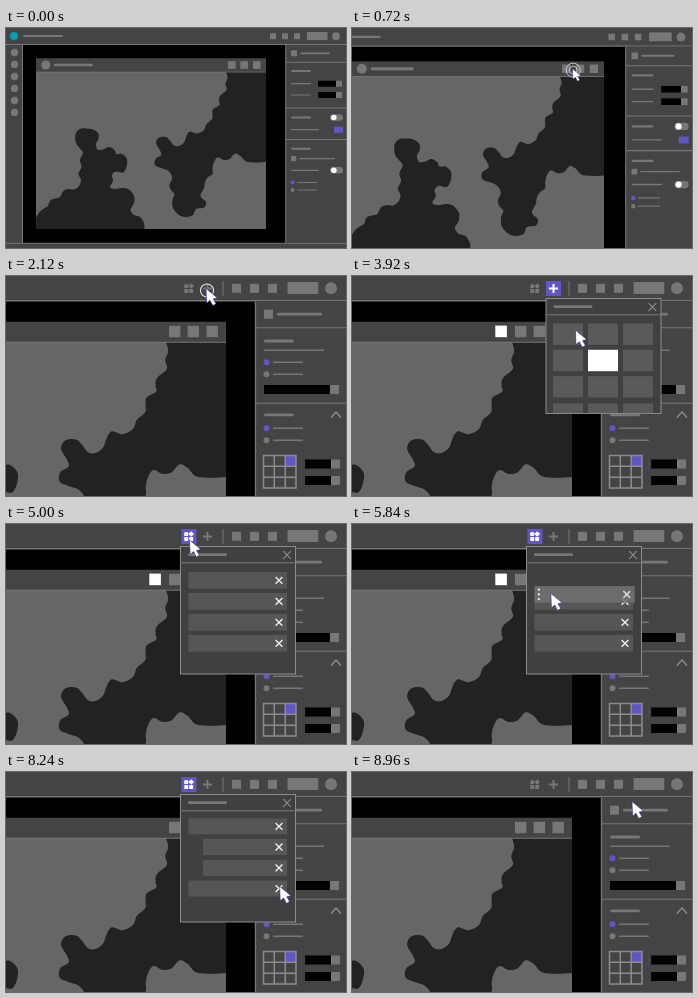
An HTML page for the animation above (9.6 s loop, 340x220 px).

```html
<!DOCTYPE html>
<html lang="en">
<head>
<meta charset="utf-8">
<title>Layout editor</title>
<style>
  html, body { margin: 0; width: 100%; height: 100%; overflow: hidden; background: #000; }
  svg { display: block; width: 340px; height: 220px; }
  .bar { fill: #444; }
  .ui { fill: #777; }
  .line { stroke: #777; fill: none; }
  .frame { stroke: #8c8c8c; stroke-width: 1.5; fill: none; }
  .accent { fill: #6057c4; }
  .ink { fill: #000; }
  .light { fill: #fff; }
  .map { fill: #666; }
  .land { fill: #222; }
  .pop { fill: #404040; stroke: #8c8c8c; }
  .cell { fill: #5a5a5a; }
  .row { fill: #565656; }
  .cross { stroke: #eee; stroke-width: 1.4; fill: none; }
  .dim { stroke: #8c8c8c; stroke-width: 1.2; }
  .ring { fill: none; stroke: #e4e4e4; stroke-width: 1.1; }
  .arrow { fill: #fff; stroke: #2c2482; stroke-width: .6; }
</style>
</head>
<body>
<svg viewBox="0 0 340 220">
  <g id="scene">
    <g id="base"></g>
    <!-- detail layer, drawn in zoomed pixels -->
    <g transform="translate(340 0) scale(.66667) translate(-340 0)">
      <g id="tools"></g>
      <g id="added"></g>
      <g id="plusOn"></g>
      <g id="gridOn"></g>
      <g id="picker"></g>
      <g id="list"></g>
      <g id="rings"><circle id="outer" class="ring"/><circle id="inner" class="ring"/></g>
      <path id="cursor" class="arrow" d="M0 -.5L.6 14L4 11.2L6.8 16.6L10 14.8L7.2 10L11.4 9Z"/>
    </g>
  </g>
</svg>
<script>
const LOOP = 9600, STEP = 40, ZOOM = 1.5;
const $ = id => document.getElementById(id);

// ---- drawing helpers ----
const rect = (c, x, y, w, h, r = 0) =>
  `<rect class="${c}" x="${x}" y="${y}" width="${w}" height="${h}" rx="${r}"/>`;
const dot = (c, x, y, r) => `<circle class="${c}" cx="${x}" cy="${y}" r="${r}"/>`;
const path = (c, d) => `<path class="${c}" d="${d}"/>`;
const bar = (x1, x2, y, h) => rect('ui', x1, y - h / 2, x2 - x1, h, h / 2);
const cross = (x, y, r, c = '') => path('cross ' + c, `M${x - r} ${y - r}l${2 * r} ${2 * r}m0 ${-2 * r}l${-2 * r} ${2 * r}`);
const each = (list, f) => list.map(f).join('');

// smooth open curve through points, given as "x,y x,y ..."
function curve(text) {
  const p = text.split(' ').map(s => s.split(',').map(Number));
  let d = 'M' + p[0];
  for (let i = 0; i < p.length - 1; i++) {
    const a = p[i - 1] || p[i], b = p[i], c = p[i + 1], e = p[i + 2] || c;
    const k = [0, 1];
    d += 'C' + k.map(j => b[j] + (c[j] - a[j]) / 6) + ' ' + k.map(j => c[j] - (e[j] - b[j]) / 6) + ' ' + c;
  }
  return d;
}

const west = curve('30,190 33.5,184 38,180.5 42,178 44,172.5 49,170.5 54,169 57,163.5 62,161 68,161.5 73,158 75,152 72.5,146 75.5,139 74,132 77,125 73.5,120 70,115 69.5,106 74,101 80,100.5 87,101.5 92,105 92.5,111 90,116 91.5,121.5 97,121.5 103,119 108.5,122 110.5,126 116,126 121,131 120.5,139 117,144.5 110,143.5 106,147 107,153 104,159 109,161 116,160 123,161.5 128,168 128,175 124.5,182 128,187 134,189 138,195 138.5,201');
const east = curve('220,44 221.5,50 219.5,56 220.5,62 214,68 213,73 213.5,77 207,81 206.5,86 206,91 200.5,96 198,102 191,105.5 184,103.5 180.5,108 178,114.5 173,118 168,117.5 164,112.5 160,109 153,109.5 150,115 154,122.5 155,127 149.5,131 149,137 155,140 161,142 165,146 166,151 163.5,157 165,162 168.5,166 166.5,172 167,180 173,187 180,189 187,187 190,181 198,179.5 200,174 194.5,168 198,160 199,154 202,149 206.5,146 206.5,140 208.5,133 212,129.3 218,132 224,130.7 229,125.5 234.5,128 240,133.5 250,134.5 260,134');

const toggle = y => rect('ui', 324, y - 3.3, 13, 6.6, 3.3) + dot('light', 327.8, y, 2.8);
const field = y => bar(285, 305, y, 1.2) + rect('ink', 312, y - 3, 18, 6) + rect('ui', 330, y - 3, 6, 6);
const rule = y => path('line', `M280 ${y}H340`);

$('base').innerHTML =
  rect('ink', 0, 0, 340, 220) +
  rect('bar', 0, 0, 340, 16.5) + rect('bar', 0, 16, 16.5, 200) + rect('bar', 0, 215, 340, 5) +
  path('line', 'M0 16.5H340M16.5 17V215M0 215.3H340') +
  `<circle cx="8" cy="8" r="4" fill="#00a3b4"/>` + bar(17, 57, 8, 2) +
  each([264, 276, 288], x => rect('ui', x, 5.2, 6, 6)) +
  rect('ui', 301, 4, 20.5, 8) + dot('ui', 330, 8.2, 4) +
  each([24, 36, 48, 60, 72, 84], y => dot('ui', 8.5, y + .5, 3.7)) +
  rect('map', 30, 30.6, 230, 170.4) +
  path('land', west + 'L30 201V190Z') + path('land', east + 'V44Z') +
  rect('bar', 30, 30.6, 230, 13.4) +
  `<path class="line" d="M30 44.1H260" stroke-width=".7"/>` +
  dot('ui', 39.8, 37, 4.5) + bar(48, 87, 37, 2.6) +
  each([222, 234.4, 247], x => rect('ui', x, 33.2, 7.6, 7.6)) +
  rect('bar', 280, 17, 60, 198) + path('line', 'M279.7 17V215') +
  '<g id="props">' +
  rect('ui', 285, 22.3, 6, 6) + bar(294, 324, 25.3, 1.8) + rule(34.3) +
  bar(285, 305, 43, 2) + field(55.7) + field(67) + rule(80) +
  bar(285, 305, 89.5, 2) + toggle(89.5) +
  bar(285, 313, 101.7, 1.2) + rect('accent', 328, 98.7, 9, 6.2) + rule(111.5) +
  bar(285, 305, 120.8, 2) + rect('ui', 285, 128, 5.2, 5.2) + bar(293, 329, 130.6, 1.2) +
  bar(285, 313, 142.3, 1.2) + toggle(142.3) +
  dot('accent', 286.6, 154.5, 2) + bar(291, 311, 154.5, 1.2) +
  dot('ui', 286.6, 162, 2) + bar(291, 311, 162, 1.2) + '</g>';

// ---- zoomed detail ----
const gridIcon = c => each([[178.3, 8.2], [178.3, 13], [183.2, 13]], ([x, y]) => rect(c, x, y, 3.9, 3.9, .4)) +
  path(c, 'M185.2 7.2l2.8 2.8l-2.8 2.8l-2.8 -2.8Z');
const plus = c => rect(c, 197, 11.5, 9, 2) + rect(c, 200.5, 8, 2, 9);
const choice = y => dot('accent', 260.5, y, 3) + bar(267, 297, y, 1.6) +
  dot('ui', 260.5, y + 12, 3) + bar(267, 297, y + 12, 1.6);
const wideRule = y => path('line', `M250 ${y}H340`);
const input = (x, y, w) => rect('ink', x, y, w, 9) + rect('ui', x + w, y, 9, 9);

$('tools').innerHTML =
  gridIcon('ui') + plus('ui') + path('line', 'M217 5V20') +
  rect('bar', 250.5, 26, 90, 296) +
  rect('ui', 258, 33.7, 9, 9) + bar(271, 316, 38.2, 2.8) + wideRule(51.7) +
  bar(258, 288, 65, 2.8) + bar(258, 318, 74.3, 1.5) + choice(86.2) +
  input(258, 109, 66) + wideRule(127.3) +
  bar(258, 288, 138.8, 2.8) + path('frame', 'M325 141.5L330 136L335 141.5') + choice(152.2) +
  rect('accent', 279, 179, 11, 11) +
  path('frame', 'M257.5 179.5H290V212H257.5ZM268.3 179V212M279.2 179V212M257 190.3H290M257 201.2H290') +
  input(299, 183.5, 26) + input(299, 200, 26);

$('added').innerHTML = rect('light', 143.3, 49.6, 11.6, 11.6);
$('plusOn').innerHTML = rect('accent', 194, 5, 15, 15) + plus('light');
$('gridOn').innerHTML = rect('accent', 175.5, 5, 15, 15) + gridIcon('light');

const popup = (x, h) => rect('pop', x + .5, 22.5, 115, h) + path('line', `M${x} 38.8h116`) +
  bar(x + 8, x + 47, 30.7, 2.8) + cross(x + 107, 31, 3.8, 'dim');

$('picker').innerHTML = popup(193.5, 115) +
  each([47.5, 73.8, 100.2, 127.5], y =>
    each([201, 236, 271], x => rect('cell', x, y, 30, y > 120 ? 9.6 : 21.4))) +
  `<g id="picked">${rect('light', 236, 73.8, 30, 21.4)}</g>`;

const item = (x, y, h) => rect('row', x, y, 281 - x, h) + cross(273, y + h / 2, 3.4);
$('list').innerHTML = popup(174, 127.5) +
  '<g id="flat"><g id="first">' + item(182.5, 48, 16.6) + '</g>' +
  each([69, 90, 111], y => item(182.5, y, 16.6)) +
  '<g id="drag" opacity=".9"><rect id="dragBox" x="182.5" fill="#707070" height="16.6"/><g id="dragMarks">' +
  cross(273, 8.3, 3.4) + each([3.5, 8.3, 13], y => rect('light', 184, y - 1, 2, 2)) + '</g></g></g>' +
  '<g id="nested">' + item(182.5, 46.3, 16) + item(197, 67, 16) + item(197, 87.8, 16) + item(182.5, 108.6, 16) +
  '<g id="last">' + item(182.5, 129, 16) + '</g></g>';

// ---- motion ----
// cursor tip: start time, end time, x, y
const moves = [
  [40, 440, 177, 56], [1560, 1960, 200, 13], [2560, 2960, 251, 83], [3760, 4160, 182, 12],
  [4960, 5360, 197, 56], [5360, 6160, 200, 79], [6960, 7360, 272, 136], [8160, 8560, 280, 30]
];
const clicks = [440, 1960, 2960, 4160, 7360, 8560];
const CLICK = 360, ECHO = 160;

const ramp = (t, a, b) => Math.min(1, Math.max(0, (t - a) / (b - a)));
const between = (t, a, b, fade = 200) => ramp(t, a, a + fade) - ramp(t, b, b + fade);
const set = (id, attrs) => { for (const k in attrs) $(id).setAttribute(k, attrs[k]); };
const show = (id, v) => set(id, { opacity: v, display: v > 0 ? 'inline' : 'none' });
const ripple = age => 11.3 * Math.pow(Math.max(0, age) / CLICK, .67);

function tip(t) {
  let x = 190, y = 336;
  for (const [a, b, tx, ty] of moves) {
    const k = ramp(t, a, b);
    x += (tx - x) * k;
    y += (ty - y) * k;
  }
  return [x, y];
}

function draw(t) {
  const zoom = 1 + (ZOOM - 1) * ramp(t, 610, 1160);
  set('scene', { transform: `translate(${340 - 340 * zoom} 0) scale(${zoom})` });

  const detail = ramp(t, 960, 1160);
  show('tools', detail);
  show('props', detail < 1 ? 1 : 0);

  const picker = between(t, 2120, 4320), list = between(t, 4520, 8760);
  show('picker', picker);
  show('plusOn', picker);
  show('list', list);
  show('gridOn', list);
  show('picked', ramp(t, 3120, 3200));
  show('added', between(t, 3280, 7520));

  const dragging = t > 5360;
  show('flat', t < 6560 ? 1 : 0);
  show('first', dragging ? 0 : 1);
  show('drag', dragging ? .9 : 0);
  show('nested', t < 6560 ? 0 : 1);
  show('last', 1 - ramp(t, 7520, 7720));
  const k = ramp(t, 5360, 6160), dy = 48 + 23.5 * k;
  set('dragBox', { y: dy, width: 98.5 + 3 * k });
  set('dragMarks', { transform: `translate(${3 * k} ${dy})` });

  const [x, y] = tip(t);
  set('cursor', { transform: `translate(${x} ${y})` });
  show('cursor', t > 40 ? 1 : 0);

  const start = clicks.find(c => t > c && t < c + CLICK);
  show('rings', start === undefined ? 0 : 1 - ramp(t, start + 280, start + CLICK));
  if (start !== undefined) {
    set('outer', { cx: x + 1, cy: y + 1.5, r: ripple(t - start) });
    set('inner', { cx: x + 1, cy: y + 1.5, r: ripple(t - start - ECHO) });
  }
}

const began = performance.now();
function tick() {
  const t = (performance.now() - began) % LOOP;
  draw(Math.floor(t / STEP) * STEP);
  requestAnimationFrame(tick);
}
tick();
</script>
</body>
</html>
```
